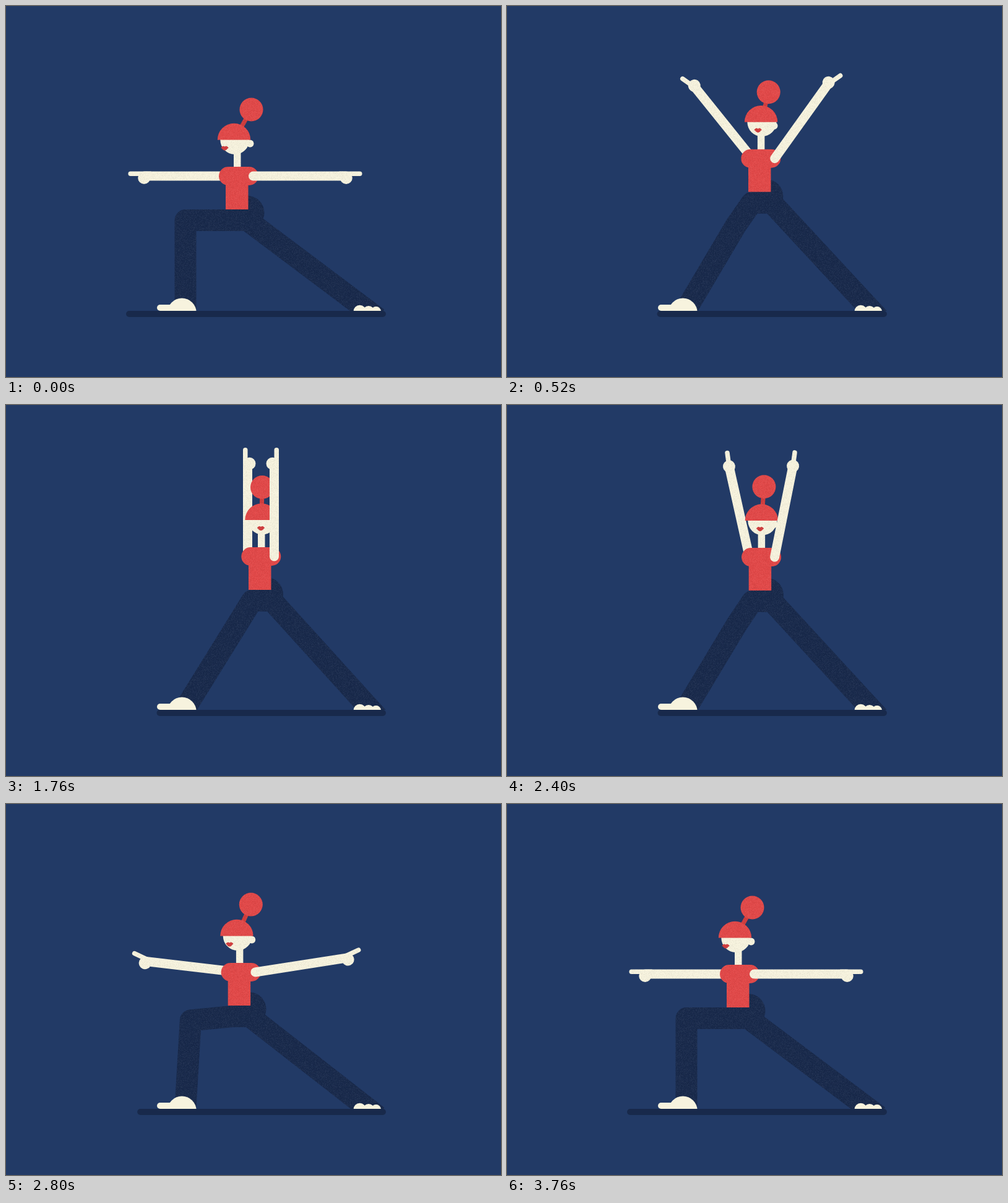
These frames come from a looping animation (800 by 600 pixels, 3.8 s). An HTML page with a canvas:

```html
<!DOCTYPE html>
<html lang="en">
<head>
<meta charset="utf-8">
<title>Yoga stretch</title>
<style>
  html, body { margin: 0; width: 100%; height: 100%; overflow: hidden; background: #223a66; }
  canvas { display: block; }
</style>
</head>
<body>
<canvas id="stage" width="800" height="600"></canvas>
<script>
const LOOP = 3800, STEP = 40, FLOOR = 493;
const NAVY = '#18294b', RED = '#e24848', DARK_RED = '#d03c3c', CREAM = '#f7f3de';
const ctx = document.getElementById('stage').getContext('2d');

// Each part rises between the first two times and sinks between the last two.
const TRACKS = {
  body: [22, 602, 2335, 2913],
  mat: [80, 560, 2512, 3000],
  arm: [45, 878, 2248, 2933],
  hand: [257, 874, 2247, 3097],
  flip: [0, 880, 2080, 2720],
  turn: [0, 800, 2233, 3066],
  bun: [70, 875, 2240, 3017]
};

const smooth = (t, a, b) => {
  const u = Math.min(1, Math.max(0, (t - a) / (b - a)));
  return u * u * (3 - 2 * u);
};
const track = (t, [a, b, c, d]) => smooth(t, a, b) - smooth(t, c, d);

// Vertical swing of the bun: it trails behind, then overshoots and settles.
function swing(t) {
  if (t < 0 || t > 1500) return 0;
  return t < 580
    ? 10.5 * (t / 580) * Math.sin(Math.PI * t / 580)
    : -7.5 * (1500 - t) / 920 * Math.sin(Math.PI * (t - 580) / 480);
}

function random(seed) {
  return () => (seed = (seed * 1664525 + 1013904223) >>> 0) / 4294967296;
}

function makeGrain(size) {
  const tile = document.createElement('canvas');
  tile.width = tile.height = size;
  const c = tile.getContext('2d'), image = c.createImageData(size, size), rnd = random(7);
  for (let i = 0; i < image.data.length; i += 4) {
    const shade = rnd() < 0.5 ? 0 : 255;
    image.data.fill(shade, i, i + 3);
    image.data[i + 3] = rnd() * 14;
  }
  c.putImageData(image, 0, 0);
  return ctx.createPattern(tile, 'repeat');
}
const grain = makeGrain(256);

function circle(x, y, r, color, start = 0) {
  ctx.fillStyle = color;
  ctx.beginPath();
  ctx.arc(x, y, r, start, Math.PI * 2);
  ctx.fill();
}
function pill(x, y, w, h, color) {
  ctx.fillStyle = color;
  ctx.beginPath();
  ctx.roundRect(x, y, w, h, h / 2);
  ctx.fill();
}
function rect(x, y, w, h, color) {
  ctx.fillStyle = color;
  ctx.fillRect(x, y, w, h);
}
function limb(points, width, color, cap = 'round') {
  ctx.strokeStyle = color;
  ctx.lineWidth = width;
  ctx.lineCap = cap;
  ctx.lineJoin = 'round';
  ctx.beginPath();
  points.forEach(([x, y]) => ctx.lineTo(x, y));
  ctx.stroke();
}

function drawArm(x, y, side, raise, wrist, flip) {
  const angle = raise * Math.PI / 2;
  ctx.save();
  ctx.translate(x, y);
  ctx.scale(side, 1);
  ctx.rotate(-angle);
  limb([[0, 0], [150, 0]], 15, CREAM);
  ctx.translate(150.3, 0);
  ctx.rotate(angle - wrist * Math.PI / 2);
  limb([[-10, -3.75 * flip], [22, -3.75 * flip]], 7.5, CREAM);
  circle(0, 3 * flip, 10, CREAM);
  ctx.restore();
}

function drawLegs(p) {
  const y = 346.5 - 30 * p;
  const frontHip = [362 + 35.5 * p, y], backHip = [390 + 40 * p, y];
  const knee = [290 + 84 * p, 346.5 + 38 * p - 30 * p * p];
  circle(390 + 30.5 * p, 334.5 - 28.3 * p, 27.5, NAVY);
  limb([[290, 490], knee, frontHip, backHip, [600.6, 504.7]], 35, NAVY, 'butt');
  limb([[290, 490], [290, 500]], 34, NAVY, 'butt');
}

function drawHead(t, p, k) {
  const x = 368.5 + 44.5 * p, y = 216.5 - 30.5 * p;
  const bunX = x + 28 - 27 * k.bun;
  const bunY = y - 49 - 4 * k.bun + swing(t) - swing(t - 2240);

  rect(368 + 39 * p, y + 15, 11.5, 32, CREAM);
  limb([[x, y], [bunX, bunY]], 7, DARK_RED, 'butt');
  circle(bunX, bunY, 19, RED);
  circle(x + 26 - 7 * k.turn, y + 6, 6, CREAM);
  circle(x + 1.3, y, 23.5, CREAM);
  circle(x, y, 26.7, RED, Math.PI);

  ctx.save();
  ctx.translate(x - 15 + 14 * k.turn, y + 13.5);
  ctx.fillStyle = DARK_RED;
  ctx.fill(new Path2D('M-6.3-.6Q-3-5.4 0-2.4Q3-5.4 6.3-.6Q4.5 0 3.2 2.2Q0 5-3.2 2.2Q-4.5 0-6.3-.6Z'));
  ctx.restore();
}

function drawShirt(p) {
  const x = 355 + 37 * p, y = 260 - 30 * p;
  pill(344 + 36.3 * p, y, 64, 30, RED);
  rect(x, y + 15, 36.5, 54, RED);
}

function drawFeet() {
  pill(244, 483, 40, 10, CREAM);
  circle(284.3, 496, 23.5, CREAM);
  circle(571.7, 494, 10.2, CREAM);
  circle(586, 494.5, 9.5, CREAM);
  circle(598, 494.3, 8.2, CREAM);
}

function drawGrain(step) {
  const rnd = random(step * 7919 + 1);
  rnd();
  const dx = Math.floor(rnd() * 256), dy = Math.floor(rnd() * 256);
  ctx.save();
  ctx.globalCompositeOperation = 'source-atop';
  ctx.translate(-dx, -dy);
  rect(dx, dy, 800, 600, grain);
  ctx.restore();
}

function draw(t) {
  const k = {};
  for (const name in TRACKS) k[name] = track(t, TRACKS[name]);
  const p = k.body, shoulderY = 275 - 30 * p, flip = 1 - 2 * k.flip;

  ctx.clearRect(0, 0, 800, 600);
  drawArm(373.5 + 37 * p - 20 * k.arm, shoulderY, -1, k.arm ** 1.12, k.hand, flip);
  drawLegs(p);
  drawHead(t, p, k);
  drawShirt(p);
  drawArm(399.5 + 37 * p - 3 * k.arm, shoulderY, 1, k.arm, k.hand, flip);
  drawGrain(t / STEP);
  drawFeet();

  // Everything stands on the mat, so cut below it and slip the mat underneath.
  ctx.clearRect(0, FLOOR, 800, 600 - FLOOR);
  ctx.globalCompositeOperation = 'destination-over';
  const left = 194 + 49.5 * k.mat;
  pill(left, FLOOR, 614 - left, 10, NAVY);
  ctx.globalCompositeOperation = 'source-over';
}

const begin = performance.now();
function tick() {
  const t = (performance.now() - begin) % LOOP;
  draw(Math.floor(t / STEP) * STEP);
  requestAnimationFrame(tick);
}
tick();
</script>
</body>
</html>
```
